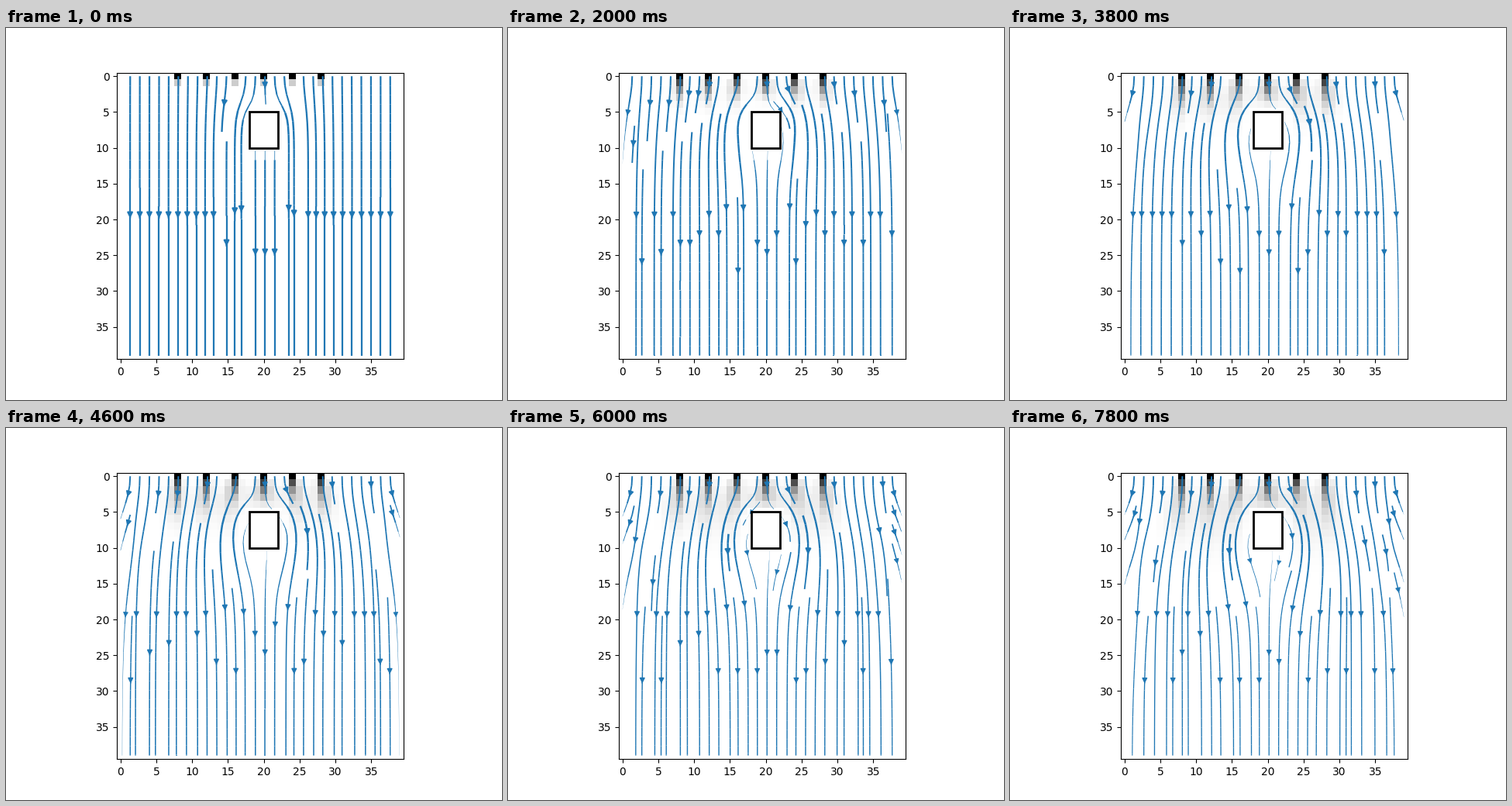
A matplotlib script for the animation above (8 s loop, 640x480 px).

```python
import numpy as np
import matplotlib.pyplot as plt
from matplotlib.animation import ArtistAnimation
from matplotlib.patches import Rectangle

N = 40              # grid cells per side
FRAMES = 40
SPEED = 0.19        # inflow, cells per step
SWEEPS = 16         # pressure sweeps per projection
VISCOSITY = 0.005
DIFFUSION = 0.02
X0, X1, Y0, Y1 = 18, 22, 5, 10
BOX = (slice(Y0, Y1 + 1), slice(X0, X1 + 1))
VENTS = range(8, 29, 4)

rows, cols = np.mgrid[0:N, 0:N].astype(float)


def neighbours(f):
    return f[1:-1, 2:] + f[1:-1, :-2] + f[2:, 1:-1] + f[:-2, 1:-1]


def diffuse(field, a):
    # The divisor exceeds 1 + 4a, so the field also fades a little.
    out = field.copy()
    out[1:-1, 1:-1] = (field[1:-1, 1:-1] + a * neighbours(field)) / (1 + 6 * a)
    return out


def sample(field, y, x):
    y, x = np.clip(y, 0, N - 1.001), np.clip(x, 0, N - 1.001)
    j, i = y.astype(int), x.astype(int)
    fy, fx = y - j, x - i
    top = field[j, i] * (1 - fx) + field[j, i + 1] * fx
    low = field[j + 1, i] * (1 - fx) + field[j + 1, i + 1] * fx
    return top * (1 - fy) + low * fy


def advect(field, u, v):
    out = field.copy()
    out[1:-1, 1:-1] = sample(field, rows - v, cols - u)[1:-1, 1:-1]
    return out


def set_bounds(u, v):
    u[0], v[0] = 0, SPEED
    u[-1], v[-1] = u[-2], v[-2]
    for f in (u, v):
        f[:, 0] = f[:, -1] = 0
        f[BOX] = 0


def project(u, v):
    set_bounds(u, v)
    v[Y0, X0:X1 + 1] = -0.3 * SPEED     # flow bounces off the upper face
    div = np.zeros((N, N))
    div[1:-1, 1:-1] = (u[1:-1, 2:] - u[1:-1, :-2]
                       + v[2:, 1:-1] - v[:-2, 1:-1]) / 2
    div[Y0 + 1:Y1 + 2, X0:X1 + 1] = 0
    div[Y1 + 2:, X0 - 4:X1 + 5] *= 0.15  # the wake closes slowly
    p = np.zeros((N, N))
    for _ in range(SWEEPS):
        p[1:-1, 1:-1] = (neighbours(p) - div[1:-1, 1:-1]) / 4
        p[0] = p[1]
    u[1:-1, 1:-1] -= (p[1:-1, 2:] - p[1:-1, :-2]) / 2
    v[1:-1, 1:-1] -= (p[2:, 1:-1] - p[:-2, 1:-1]) / 2
    set_bounds(u, v)


def simulate():
    u, v = np.zeros((N, N)), np.full((N, N), SPEED)
    dye = np.zeros((N, N))
    dye[0, list(VENTS)] = 1
    project(u, v)
    for _ in range(FRAMES):
        u, v = diffuse(u, VISCOSITY), diffuse(v, VISCOSITY)
        project(u, v)
        u, v = advect(u, u, v), advect(v, u, v)
        project(u, v)
        dye = advect(diffuse(dye, DIFFUSION), u, v)
        dye[BOX] = 0
        yield u, v, dye


fig, ax = plt.subplots(figsize=(6.4, 4.8), dpi=100)
axis = np.arange(N)
shots = []
for u, v, dye in simulate():
    image = ax.imshow(dye, cmap="gray_r", vmin=0, vmax=1)
    speed = np.hypot(u, v)
    count = len(ax.patches)
    flow = ax.streamplot(axis, axis, u, v, color="C0",
                         linewidth=1.9 * speed / speed.max())
    shots.append([image, flow.lines, *ax.patches[count:]])

ax.add_patch(Rectangle((X0, Y0), X1 - X0, Y1 - Y0, fill=False,
                       edgecolor="black", linewidth=2, zorder=3))
ax.set_xlim(-0.5, N - 0.5)
ax.set_ylim(N - 0.5, -0.5)

anim = ArtistAnimation(fig, shots, interval=200, repeat=True, repeat_delay=0)
plt.show()
```
